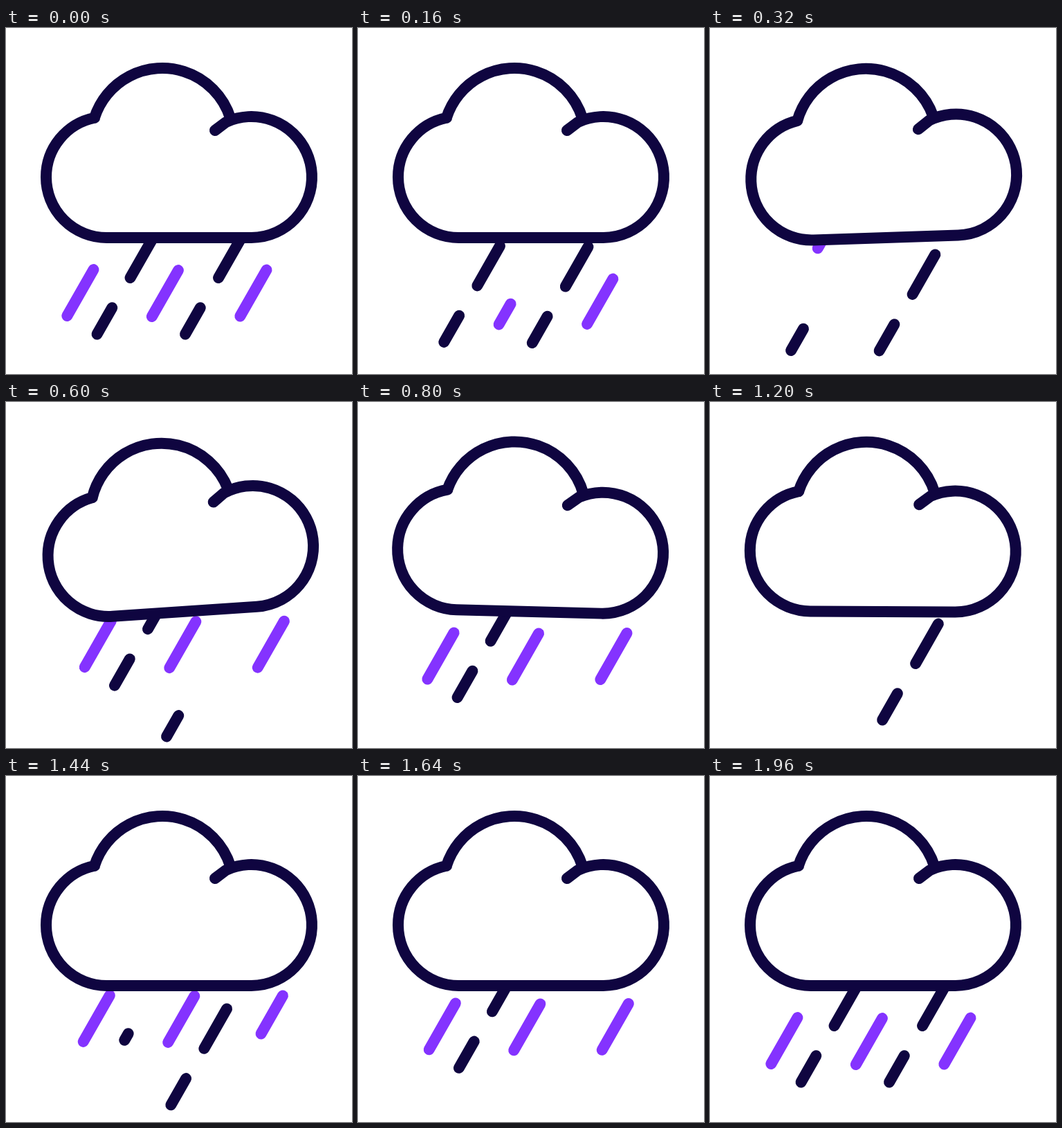
An HTML page with a canvas for the animation above (2 s loop, 500 by 500 pixels).

```html
<!DOCTYPE html>
<html lang="en">
<head>
<meta charset="utf-8">
<title>Rain cloud</title>
<style>
  html, body { margin: 0; width: 100%; height: 100%; overflow: hidden; background: #fff; }
  canvas { display: block; width: 500px; height: 500px; }
</style>
</head>
<body>
<canvas id="stage" width="500" height="500"></canvas>
<script>
const ctx = document.getElementById('stage').getContext('2d');
const DARK = '#0f0540', VIOLET = '#8433ff';
const LOOP = 2000, STEP = 40, SPAN = 1960;
const GAP = 127.5;                      // distance between the two dark pairs
const SLANT = Math.PI * 0.335;          // angle of every drop
const GROW = 140, GROW_LAG = 40;        // a drop draws itself, the next follows
const SHRINK = 110, SHRINK_LAG = 65;

const clamp = v => Math.max(0, Math.min(1, v));
const mix = (a, b, k) => a + (b - a) * k;

// (x, y) is the lower end at the moment the shower is in its middle pose.
const drop = (color, x, y, length) => ({ color, x, y, length });
const pair = x => [drop(DARK, x + 48, 361, 66), drop(DARK, x, 442.5, 44)];
const left = [
  drop(VIOLET, 88.3, 416, 77),
  drop(VIOLET, 210.8, 417, 77),
  drop(VIOLET, 338.3, 416.5, 77),
  ...pair(131.5)
];
const right = pair(131.5 + GAP);

// Times count from the middle pose at `at`; slide and fall are px per ms.
const showers = [
  { at: 980, drops: left, born: -715, dies: -155, slide: 0.067, fall: 0.0865, drag: 0 },
  { at: SPAN, drops: left, born: -715, dies: 13, slide: 0.045, fall: 0.069, drag: -1.4e-5 },
  ...[980, SPAN].map(at =>
    ({ at, drops: right, born: -180, dies: 485, slide: 0.045, fall: 0.082, drag: 2.3e-5 }))
];

function drawShower(s, time) {
  const t = time - s.at;
  const dx = -s.slide * t, dy = s.fall * t - s.drag * t * t;
  s.drops.forEach((d, i) => {
    const grown = clamp((t - s.born - i * GROW_LAG) / GROW);
    const gone = clamp((t - s.dies - i * SHRINK_LAG) / SHRINK) ** 2;
    if (grown <= gone) return;
    const point = k => [
      d.x + dx + d.length * (1 - k) * Math.cos(SLANT),
      d.y + dy - d.length * (1 - k) * Math.sin(SLANT)
    ];
    ctx.strokeStyle = d.color;
    ctx.beginPath();
    ctx.moveTo(...point(gone));
    ctx.lineTo(...point(grown));
    ctx.stroke();
  });
}

// Leans back, swings past the rest pose and settles.
function tilt(t) {
  const ease = (from, length) => (1 - Math.cos(Math.PI * clamp((t - from) / length))) / 2;
  return -5 * ease(180, 330) + 6.7 * ease(510, 330) - 1.7 * ease(840, 500);
}

function drawCloud(deg) {
  ctx.save();
  ctx.translate(250, 180.5);
  ctx.rotate(deg * Math.PI / 180);
  ctx.translate(-250, -180.5);
  ctx.beginPath();
  ctx.moveTo(302, 148);
  ctx.arc(354.5, 215.5, 87.5, -2, Math.PI / 2);
  ctx.arc(145.5, 215.5, 87.5, Math.PI / 2, Math.atan2(-85.7, -17.5));
  ctx.arc(226, 161, 103, Math.atan2(-31, -98), Math.atan2(-30, 98));
  ctx.fillStyle = '#fff';
  ctx.fill();
  ctx.strokeStyle = DARK;
  ctx.stroke();
  ctx.restore();
}

function draw(t) {
  ctx.fillStyle = '#fff';
  ctx.fillRect(0, 0, 500, 500);
  ctx.lineWidth = 16;
  ctx.lineCap = ctx.lineJoin = 'round';
  for (const s of showers) {
    drawShower(s, t);
    drawShower(s, t + SPAN); // showers that carry over the loop point
  }
  drawCloud(tilt(t));
}

const start = performance.now();
function tick() {
  const t = (performance.now() - start) % LOOP;
  draw(Math.floor(t / STEP) * STEP % SPAN);
  requestAnimationFrame(tick);
}
tick();
</script>
</body>
</html>
```
